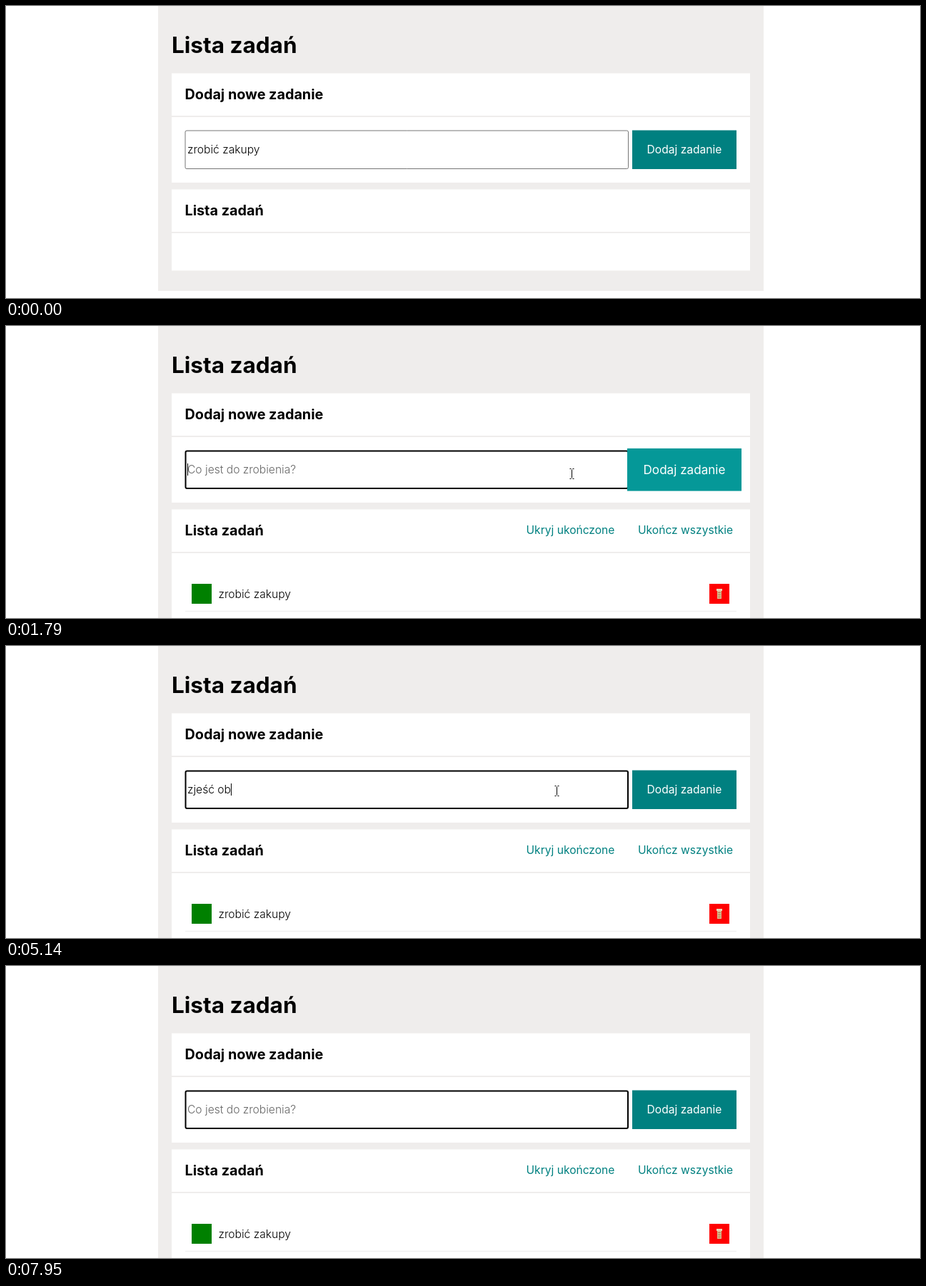
An HTML page with a canvas for the animation above (8000 ms loop, 1280x410 px).

```html
<!DOCTYPE html>
<html lang="pl">
<head>
<meta charset="utf-8">
<title>Lista zadań</title>
<style>
  html, body { margin: 0; height: 100%; overflow: hidden; background: #fff; }
  canvas { display: block; }
</style>
</head>
<body>
<canvas id="stage" width="1280" height="410"></canvas>
<script>
const ctx = document.getElementById('stage').getContext('2d');
const LOOP = 8000, FADE = 300;
const FIRST_ADD = 1380, SECOND_PRESS = 7020, SECOND_ADD = 7140;
const GREY = '#efedec', TEAL = '#008080';

const TASK = 'zjeść obiad';
const KEY_TIMES = [2930, 3200, 3330, 3680, 4280, 4480, 4750, 5140, 5410, 5610, 5850];
const CARET_OFF = [[0, FIRST_ADD], [1890, 2400], [6390, 6880], [SECOND_PRESS, SECOND_ADD], [7650, LOOP]];

// Pointer path: time, x, y
const POINTER = [
  [330, 1016, 273], [400, 945, 205], [460, 897, 161], [780, 897, 161],
  [930, 936, 211], [1110, 938, 213], [1730, 938, 213], [1790, 792, 207],
  [2140, 776, 204], [2340, 776, 204], [2460, 771, 203], [6399, 771, 203],
  [6400, 958, 216], [6480, 960, 219], [6880, 969, 209], [7550, 969, 209],
  [7740, 1099, 252]
];

const within = (t, [from, to]) => t >= from && t < to;

// CSS "ease": cubic-bezier(.25, .1, .25, 1)
function ease(x) {
  if (x <= 0) return 0;
  if (x >= 1) return 1;
  const bezier = (s, a, b) => 3 * s * (1 - s) ** 2 * a + 3 * s * s * (1 - s) * b + s ** 3;
  let low = 0, high = 1;
  for (let i = 0; i < 20; i++) {
    const mid = (low + high) / 2;
    if (bezier(mid, .25, .25) < x) low = mid; else high = mid;
  }
  return bezier(low, .1, 1);
}

// Transition that starts at "on" and reverses at "off"
function pulse(t, on, off) {
  if (t < off) return ease((t - on) / FADE);
  const peak = ease((off - on) / FADE);
  return peak * (1 - ease((t - off) / (FADE * peak)));
}

function rect(color, left, top, right, bottom) {
  ctx.fillStyle = color;
  ctx.fillRect(left, top, right - left, bottom - top);
}

function text(string, x, y, size, weight, color, align = 'left') {
  ctx.font = `${weight} ${size}px Inter, sans-serif`;
  ctx.fillStyle = color;
  ctx.textAlign = align;
  ctx.fillText(string, x, y);
  return ctx.measureText(string).width;
}

function panel(title, top, bottom) {
  rect('#fff', 232, top, 1042, bottom);
  rect(GREY, 232, top + 59.5, 1042, top + 61.5);
  text(title, 250.5, top + 36, 19.8, 700, '#000');
}

function listItem() {
  text('Ukryj ukończone', 728.5, 291.5, 15.6, 400, TEAL);
  text('Ukończ wszystkie', 885, 291.5, 15.6, 400, TEAL);
  rect('#008000', 260, 362, 288, 390);
  text('zrobić zakupy', 297.5, 381.5, 15.6, 300, '#000');
  rect('#eee', 251, 400, 1023, 401);
  rect('#f00', 985, 362, 1013, 390);
  // Bin icon
  rect('#e8d8b8', 995, 369, 1003, 372);
  rect('#d9b98c', 996, 372, 1002, 383);
  for (let y = 374; y < 382; y += 3) rect('#b5764f', 997, y, 1001, y + 1);
}

function inputField(t) {
  const focused = t >= FIRST_ADD && !within(t, [SECOND_PRESS, SECOND_ADD]);
  const line = focused ? 2 : 1;
  ctx.lineWidth = line;
  ctx.strokeStyle = focused ? '#000' : '#767676';
  ctx.beginPath();
  ctx.roundRect(250.5 + line / 2, 174.5 + line / 2, 621.5 - line, 54.5 - line, 2);
  ctx.stroke();

  const typed = t < FIRST_ADD ? 'zrobić zakupy'
    : t < SECOND_ADD ? TASK.slice(0, KEY_TIMES.filter(k => k <= t).length) : '';
  const width = text(typed, 254, 207, 15.6, 300, '#000');
  if (!typed) text('Co jest do zrobienia?', 254, 207, 15.6, 300, '#666');
  if (!CARET_OFF.some(span => within(t, span))) rect('#000', 254 + width, 193, 255 + width, 210);
}

function addButton(t) {
  const hover = pulse(t, 795, 1775) + pulse(t, 6400, 7600);
  const press = pulse(t, 1250, FIRST_ADD) + pulse(t, 7010, SECOND_ADD);
  const scale = 1 + .1 * hover;
  const level = 128 + 25 * (hover + press);
  ctx.save();
  ctx.translate(950, 201.75);
  ctx.scale(scale, scale);
  rect(`rgb(${5 * (hover + press)}, ${level}, ${level})`, -73, -27.25, 73, 27.25);
  text('Dodaj zadanie', 0, 5.25, 15.6, 400, '#fff', 'center');
  ctx.restore();
}

function pointer(t) {
  const next = POINTER.findIndex(key => key[0] > t);
  if (next < 1) return;
  const [t0, x0, y0] = POINTER[next - 1], [t1, x1, y1] = POINTER[next];
  const part = (t - t0) / (t1 - t0);
  const x = Math.round(x0 + (x1 - x0) * part), y = Math.round(y0 + (y1 - y0) * part);
  ctx.save();
  ctx.translate(x + .5, y + .5);
  ctx.lineWidth = 1;
  ctx.strokeStyle = '#000';
  if (within(t, [1775, 6400])) {
    ctx.stroke(new Path2D('M-3-7H-1M1-7H3M0-6V6M-3 7H-1M1 7H3'));
  } else {
    const arrow = new Path2D('M0 0V15L3.5 12L6 17.5L8.5 16.5L6 11H10.5Z');
    ctx.fillStyle = '#fff';
    ctx.fill(arrow);
    ctx.stroke(arrow);
  }
  ctx.restore();
}

function draw(now) {
  const t = now % LOOP, hasItem = t >= FIRST_ADD;
  rect('#fff', 0, 0, 1280, 410);
  rect(GREY, 213, 0, 1061, hasItem ? 410 : 400);
  text('Lista zadań', 232, 66, 31.5, 700, '#000');
  panel('Dodaj nowe zadanie', 94.5, 248);
  panel('Lista zadań', 257.5, hasItem ? 410 : 371.5);
  if (hasItem) listItem();
  inputField(t);
  addButton(t);
  pointer(t);
  requestAnimationFrame(draw);
}
requestAnimationFrame(draw);
</script>
</body>
</html>
```
